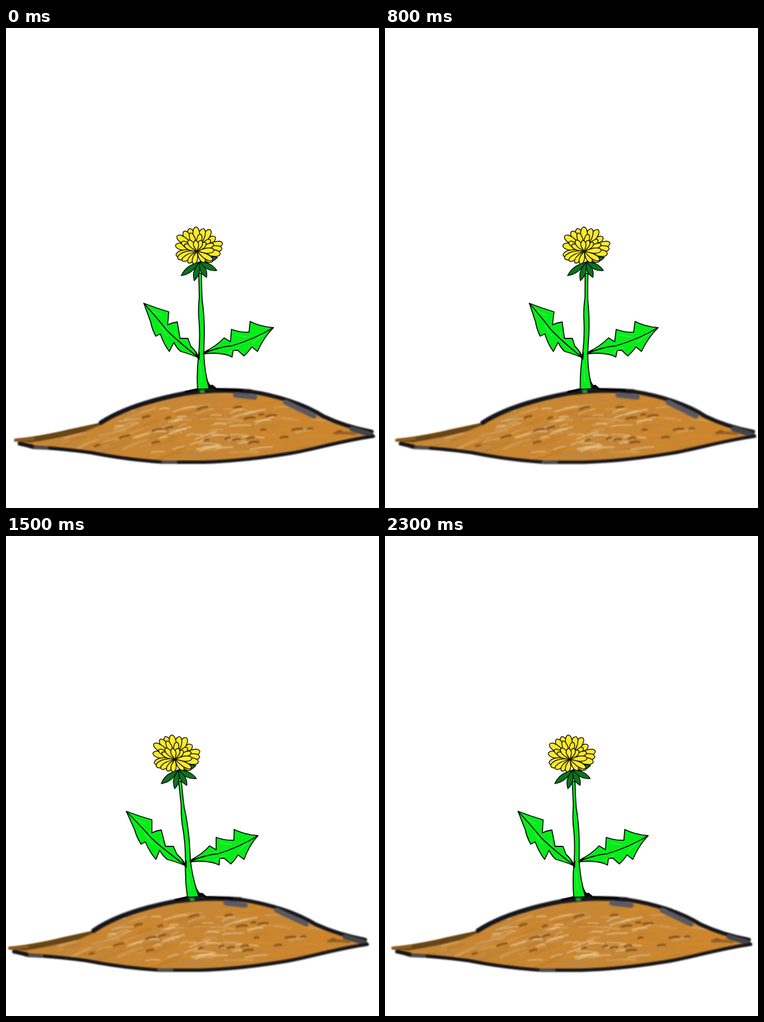
Write an HTML page that moves like this. It is 660 px wide and 849 px high and loops after 2.4 s.

```html
<!DOCTYPE html>
<html lang="en">
<head>
<meta charset="utf-8">
<title>Swaying dandelion</title>
<style>
  html, body { margin: 0; width: 100%; height: 100%; overflow: hidden; background: #fff; }
  svg { display: block; }
</style>
</head>
<body>
<svg width="660" height="849" viewBox="0 0 660 849" fill="none" stroke-linecap="round" stroke-linejoin="round">
  <defs>
    <clipPath id="soilClip"><path id="soil" d="M16 729 Q90 716 165 700 C205 675 260 657 320 647 Q375 638 432 643 C480 650 535 674 575 693 Q612 707 650 717 L649 722 C590 731 550 744 505 752 Q420 766 350 768 L280 768 Q215 764 150 752 Q90 745 45 741 Z"/></clipPath>
    <filter id="soft" x="-5%" y="-20%" width="110%" height="140%"><feGaussianBlur stdDeviation="1.3"/></filter>
    <filter id="smear" x="-5%" y="-20%" width="110%" height="140%"><feGaussianBlur stdDeviation="0.8"/></filter>
  </defs>
  <g id="scene">
    <g filter="url(#soft)">
      <use href="#soil" fill="#c98630"/>
    </g>
    <g clip-path="url(#soilClip)"><g id="texture" filter="url(#smear)"></g></g>
    <g filter="url(#soft)">
      <path d="M17 729 Q75 722 112 712 L168 700 L138 712 Q90 724 44 731 Z" fill="#664514" stroke="#664514" stroke-width="4"/>
      <path d="M17 729 L48 726" stroke="#8a5a1c" stroke-width="6"/>
      <path d="M168 698 C205 674 260 657 318 646 Q375 638 432 643" stroke="#16171a" stroke-width="8"/>
      <path d="M432 643 C480 650 530 666 562 687 Q600 705 647 714" stroke="#16171a" stroke-width="7"/>
      <path d="M406 649 L440 653 M495 662 L532 680 L545 686" stroke="#5a5860" stroke-width="9"/>
      <path d="M612 709 L645 719" stroke="#45454a" stroke-width="9"/>
      <path d="M650 722 C590 731 550 744 505 752 Q420 766 350 768 L280 768 Q215 764 150 751 Q100 744 45 741 L27 735" stroke="#15171b" stroke-width="6"/>
      <path d="M48 742 L72 743 M278 768 L300 768" stroke="#4b4d51" stroke-width="6"/>
      <path d="M24 735 L46 740" stroke="#15171b" stroke-width="7"/>
    </g>
    <path d="M318 644 L339 639 L365 633 L372 639 L418 641" stroke="#060806" stroke-width="4"/>
    <g stroke="#071007" stroke-width="1.8">
      <g fill="#08ec1c">
        <path d="M244 487 L266 495 L288 502 L286 525 Q294 521 303 520 L308 549 L322 549 L327 563 Q336 571 342 584 Q330 578 309 572 Q302 566 297 556 L289 572 Q279 559 273 541 L265 545 Q258 532 256 520 Z"/>
        <path d="M351 573 Q373 562 386 548 L397 555 L399 533 Q415 539 430 538 L432 519 Q449 528 473 530 Q456 547 445 572 L435 564 Q428 574 421 580 L410 570 L402 570 L400 582 Q385 573 351 576 Z"/>
        <path d="M341 434 L346 434 Q346 459 347 480 Q351 507 351 540 L350 574 Q351 602 356 623 Q359 632 365 638 L339 639 Q337 608 341 577 Q344 541 341 512 Q340 498 342 475 Z"/>
      </g>
      <path d="M244 487 Q270 516 284 534 Q305 555 342 584"/>
      <path d="M349 576 Q376 564 400 562 Q440 550 473 530"/>
      <path d="M336 574 L341 586 L342 575 M350 577 L358 570" stroke-width="2.5"/>
      <path d="M355 620 Q358 632 368 638 L359 637 Z" fill="#071007"/>
    </g>
    <g stroke="#7cf57e" stroke-opacity=".45" stroke-width="1.5">
      <path d="M260 501 L276 509 M272 526 L286 545 M300 538 L302 549 M394 574 L412 565 M405 543 L425 546 M437 557 L454 542 M344 594 L346 626"/>
    </g>
    <ellipse cx="347" cy="643" rx="5" ry="3" fill="#2c9d3a" filter="url(#smear)"/>
    <g id="sepals" fill="#0b7420" stroke="#06180a" stroke-width="1.5"></g>
    <g id="petals" fill="#fbea2b" stroke="#171405" stroke-width="1.5"></g>
  </g>
</svg>
<script>
const byId = id => document.getElementById(id);

function add(parent, attrs) {
  const path = document.createElementNS("http://www.w3.org/2000/svg", "path");
  for (const name in attrs) path.setAttribute(name, attrs[name]);
  byId(parent).append(path);
}

// Tapered blade from a base point to a tip; roundness 0 gives a pointed end.
function blade(parent, [bx, by], [tx, ty], width, roundness) {
  const length = Math.hypot(tx - bx, ty - by);
  const angle = Math.atan2(ty - by, tx - bx) * 180 / Math.PI;
  const half = width / 2, end = half * roundness;
  const d = `M0 0 C${length * .35} ${-half * .7} ${length * .6} ${-half * 1.25} ${length - end} ${-end * .9}` +
    ` Q${length + end * .6} 0 ${length - end} ${end * .9}` +
    ` C${length * .6} ${half * 1.25} ${length * .35} ${half * .7} 0 0Z`;
  add(parent, { d, transform: `translate(${bx} ${by}) rotate(${angle})` });
}

const sepalTips = [[374, 406], [373, 429], [310, 438], [355, 441], [333, 447]];
sepalTips.forEach(tip => blade("sepals", [342, 414], tip, 13, 0));

const outerTips = [[371, 369], [362, 356], [350, 354], [324, 354], [314, 359], [336, 351],
  [302, 367], [299, 384], [300, 402], [303, 408], [384, 380], [383, 390], [380, 400], [366, 414]];
const innerTips = [[326, 362], [344, 364], [310, 378], [362, 374], [368, 382], [369, 393],
  [311, 412], [322, 416], [352, 415], [366, 411], [315, 383], [354, 379], [322, 375], [346, 375], [335, 375], [332, 418]];
outerTips.forEach(tip => blade("petals", [338, 393], tip, 13, .8));
innerTips.forEach(tip => blade("petals", [338, 395], tip, 10, .8));

let seed = 17;
function random() {
  seed = seed * 16807 % 2147483647;
  return seed / 2147483647;
}

function streak(x, y, length, slope, stroke, width, opacity) {
  const dx = length / 2, dy = dx * slope;
  add("texture", {
    d: `M${x - dx} ${y - dy} Q${x} ${y - 2} ${x + dx} ${y + dy}`,
    stroke, "stroke-width": width, "stroke-opacity": opacity
  });
}

const tones = ["#b97a2c", "#d98a25", "#c8893c", "#d9ac68", "#b8874a"];
for (let i = 0; i < 300; i++) {
  const x = 80 + random() * 520, y = 648 + random() * 116;
  const slope = x < 300 ? -.45 + random() * .25 : -.2 + random() * .3;
  const tone = x > 430 && random() < .6 ? "#d48627" : tones[Math.floor(random() * tones.length)];
  streak(x, y, 18 + random() * 38, slope, tone, 2 + random() * 3, .55);
}
for (let i = 0; i < 42; i++) {
  const x = 200 + random() * 270, y = 672 + random() * 82;
  streak(x, y, 12 + random() * 28, -.4 + random() * .5, "#ecd5a6", 1.3 + random() * 1.5, .6);
}

const clods = [[392, 726], [408, 728], [431, 690], [452, 684], [433, 725], [438, 733], [455, 711],
  [492, 724], [515, 710], [538, 709], [288, 707], [268, 711], [355, 729], [265, 733], [348, 672],
  [287, 690], [248, 688], [210, 723], [161, 739], [410, 671], [469, 686], [590, 714]];
clods.forEach(([x, y], i) => streak(x, y, 7 + i % 3 * 5, x < 400 ? -.25 : -.1, "#80501a", 4, .85));
streak(600, 717, 36, .03, "#80531f", 5, .7);

const PERIOD = 24, PEAK = 5;

// Lean is a steady swing with a quicker step through the upright pose.
function leanAt(ms) {
  const step = Math.floor(ms / 100) % PERIOD;
  const gap = Math.abs(step - PEAK);
  const away = Math.min(gap, PERIOD - gap);
  return away <= 5 ? .0159 * (5 - away) : -.0235 - .0156 * (away - 6);
}

function draw(ms) {
  const lean = leanAt(ms);
  byId("scene").setAttribute("transform", `matrix(1 0 ${-lean} 1 ${849 * lean} 0)`);
}

const start = performance.now();
function tick() {
  draw(performance.now() - start);
  requestAnimationFrame(tick);
}
tick();
</script>
</body>
</html>
```
